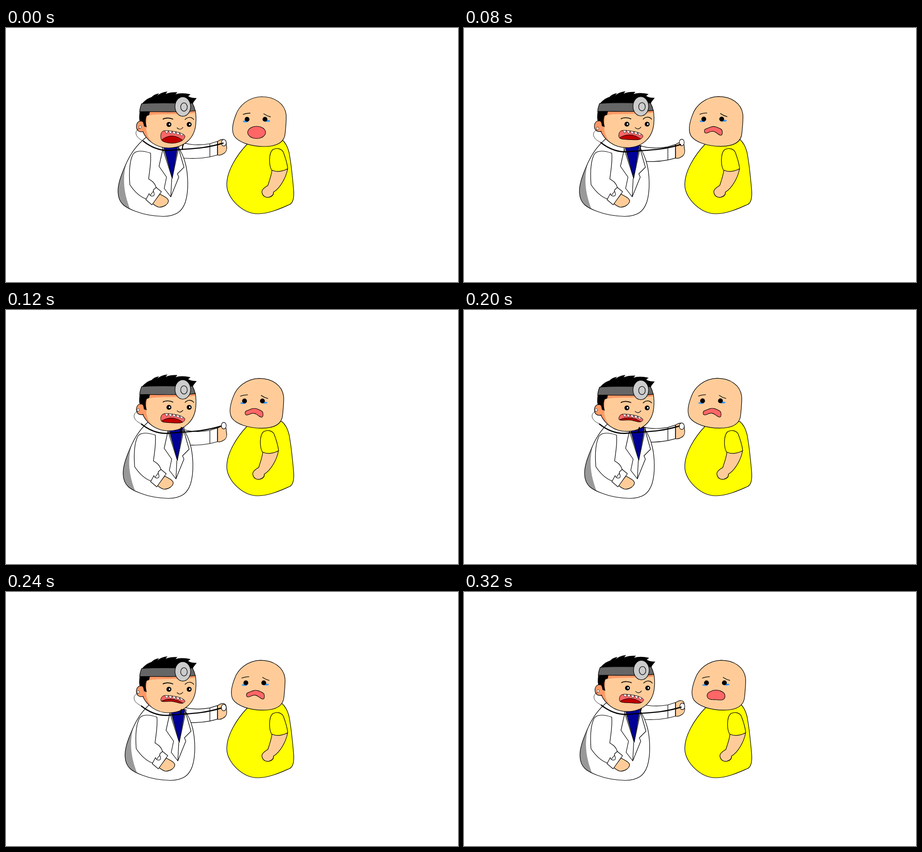
Write an HTML page with a canvas that moves like this. It is 960x540 px and loops after 0.36 s.

```html
<!DOCTYPE html>
<html lang="en">
<head>
<meta charset="utf-8">
<title>Check-up</title>
<style>
html, body { margin: 0; width: 100%; height: 100%; overflow: hidden; background: #fff; }
canvas { display: block; width: 960px; height: 540px; }
</style>
</head>
<body>
<canvas id="stage" width="960" height="540"></canvas>
<script>
const ctx = document.getElementById('stage').getContext('2d');
const STEP = 40, STEPS = 9;
const SKIN = '#ffcc99', SHADE = '#ff9966', PINK = '#ff6666', YELLOW = '#ffff00';

const mix = (a, b, u) => a + (b - a) * u;

// Straight moves between [step, value] key points
function move(step, ...keys) {
  const i = keys.findIndex(key => key[0] >= step);
  if (i < 0) return keys[keys.length - 1][1];
  if (i === 0) return keys[0][1];
  const [a, from] = keys[i - 1], [b, to] = keys[i];
  return mix(from, to, (step - a) / (b - a));
}

function pose(step) {
  return {
    coatX: move(step, [0, 0], [5, 18.2], [8, 8.4]),
    sleeveX: move(step, [0, 0], [5, 17], [8, 6.7]),
    reachY: move(step, [0, 0], [3, 10], [8, -6]),
    headX: move(step, [6, 0], [8, 1.2]),
    headY: move(step, [0, 0], [2, -0.6], [4, 4.4], [8, -0.9]),
    tubeX: move(step, [0, 0], [2, -1], [3, -4], [6, -4], [8, 0]),
    tubeY: move(step, [0, 0], [2, 3], [3, 2], [6, 2], [8, 0]),
    sickX: move(step, [1, 0], [4, -8.1], [8, 3]),
    sickY: -0.2 * Math.min(step, 4),
    armX: -6.5 * Math.max(0, 3 - Math.abs(step - 3)),
    open: move(step, [0, 1], [2, 0.5], [3, 0.5], [4, 0], [6, 0], [8, 0.4]),
    sag: move(step, [0, 0], [2, 1], [6, 1], [8, 0.35])
  };
}

// Smooth closed curve through points
function loopThrough(points) {
  const n = points.length, path = new Path2D();
  const at = i => points[(i + n) % n];
  path.moveTo(...points[0]);
  for (let i = 0; i < n; i++) {
    const [a, b, c, d] = [at(i - 1), at(i), at(i + 1), at(i + 2)];
    path.bezierCurveTo(b[0] + (c[0] - a[0]) / 6, b[1] + (c[1] - a[1]) / 6,
      c[0] - (d[0] - b[0]) / 6, c[1] - (d[1] - b[1]) / 6, c[0], c[1]);
  }
  path.closePath();
  return path;
}

function shape(d, fill, width = 1.2) {
  const path = typeof d === 'string' ? new Path2D(d) : d;
  if (fill) { ctx.fillStyle = fill; ctx.fill(path); }
  if (width) { ctx.lineWidth = width; ctx.stroke(path); }
}

function oval(x, y, rx, ry, fill, width = 0) {
  const path = new Path2D();
  path.ellipse(x, y, rx, ry, 0, 0, Math.PI * 2);
  shape(path, fill, width);
}

function at(x, y, draw) {
  ctx.save();
  ctx.translate(x, y);
  draw();
  ctx.restore();
}

function within(path, draw) {
  ctx.save();
  ctx.clip(path);
  draw();
  ctx.restore();
}

function reachingArm() {
  shape('M364 238 C382 250 412 250 433 246 L449 241 L449 270 L433 274 C412 278 394 278 364 276 Z', '#fff');
  shape('M433 246 V274');
  shape('M449.5 241 C454 238 458 236 462 237 C468 238 468 244 468 249 C470 257 468 264 462 267 C458 270 454 271 449.5 270 Z', SKIN);
}

function coat() {
  const body = new Path2D('M298 232 C276 250 264 268 254 291 C243 316 237 334 238 350 C239 374 254 382 276 390 C294 397 314 400 334 400.5 C362 400 374 390 381 370 C389 344 386 310 382 292 C378 274 372 262 364 250 Z');
  shape(body, '#fff', 0);
  within(body, () => shape('M256 286 C248 315 248 345 263 384 H225 V286 Z', '#999', 0));
  shape(body);
  shape('M331 252 L368 250 L353 320 Z', '#999', 0.9);
  shape('M335 252 L365 250 L353 320 Z', '#000099', 0.9);
  shape('M333 258 L325 294 L341 317 L336 341 L350 359 L352 320');
  shape('M366 254 L378 296 L364 310 L367 317 L350 359');
}

function restingArm() {
  shape('M327 353 C337 359 345 362 345 368 C344 375 335 381 325 381 C320 380 316 377 311 373 Z', SKIN);
  shape('M307 266 C292 261 277 259 270 268 C262 283 261 306 263 333 C272 347 286 361 300 364 L319 339 C316 329 310 325 303 321 C304 308 309 287 307 266 Z', '#fff');
  shape('M319 339 L330 348 L310 376 L297 365 L304 352 C305 357 309 358 313 357 C318 353 312 349 313 345 C314 342 317 341 319 339 Z', '#fff');
}

function eye(x, y) {
  oval(x, y, 5.2, 5.2, '#000');
  oval(x + 1.3, y - 0.2, 1.7, 1.9, '#fff');
}

function talkingMouth(open) {
  const left = [332, 231 + 9 * open], right = [373, 235 + 5 * open];
  const mouth = loopThrough([
    [329, 226], [335, 218.7], [352, 219.2], [370, 223], [380, 229.8],
    right, [353, 231 + 14 * open], left
  ]);
  const gum = x => 216 + 8 * ((x - 335) / 45) ** 2;
  shape(mouth, PINK, 0);
  within(mouth, () => {
    shape(`M${left[0] - 4} ${left[1]} Q352 219 ${right[0] + 4} ${right[1]} V250 H325 Z`, '#c00000', 1);
    for (let x = 337; x < 376; x += 8) {
      const tip = gum(x + 4) + 8;
      shape(`M${x} ${gum(x)} Q${x + 1} ${tip - 2} ${x + 4.5} ${tip} Q${x + 7} ${tip - 2} ${x + 8} ${gum(x + 8)} Z`, '#fff', 0.8);
    }
  });
  shape(mouth, null, 1);
}

function doctorHead(open) {
  const face = new Path2D('M288 176 L290 219 C298 238 318 255 345 255 C378 255 400 235 403 205 C404 195 404 186 402 175 Z');
  shape(face, SKIN, 0);
  within(face, () => {
    shape('M280 176 H300 L298 205 C296 225 304 240 322 256 H280 Z', SHADE, 0);
    shape('M300 187 C312 181 378 185 404 180 V174 H300 Z', SHADE, 0);
  });
  shape(face);
  shape('M293 197 C284 195 277 201 277 209 C277 217 282 223 292 220', SHADE);
  shape('M284 176 C283 186 282 196 285 199 C291 197 292 202 293 209 L299 211 C296 201 296 193 299 187 L304 185 L306 176 Z', '#000', 0);
  shape('M287 163 C294 155 299 150 309 147 C314 142 319 140 325 139 L321 144 C328 138 335 136 343 135 L339 140 C347 137 355 136 364 136.5 L360 141 C369 138 378 138 392 141 L387 145 C392 148 398 149 405 149 L398 158 L396 164 Z', '#000', 0);
  shape('M288 161 C310 158 370 160 396 160 C399 165 401 171 402 176 C370 180 315 177 284 178 C284 172 286 166 288 161 Z', '#666');
  oval(375.5, 167, 16.6, 20.6, '#ccc', 1.2);
  oval(378, 168, 7, 8.8, '#ccc', 1.2);
  shape('M333 194 C339 190 349 191 355 194', null, 1.7);
  shape('M380 195 C385 189 394 188 399 195', null, 1.4);
  eye(346, 205);
  eye(389, 205);
  shape('M363 212 Q370 219 376 211');
  talkingMouth(open);
}

function stethoscope() {
  shape('M285 213 C274 216 270 230 291 240', null, 0.8);
  oval(284.8, 210.5, 2.4, 3, '#fff', 0.7);
  shape('M377 247 Q374 252 375 259', null, 2.3);
  shape('M291 240 C306 252 327 262 350 260 C388 256 418 258 462 244.5', null, 2.4);
}

function patientBody() {
  shape('M513 246 C490 270 468 305 469 335 C470 362 502 395 535 395 C560 395 587 382 602 375.5 C610 372 612 362 611 346 C609 322 605 284 601 264 C598 252 593 243 586 237 Z', YELLOW);
}

function patientArm() {
  shape('M565 302 C563 316 558 329 556 335 C547 340 542 346 544 351 C546 358 552 361 558 360 C565 358 569 354 568 349 C583 340 595 317 598 300 Z', SKIN);
  shape('M566 259 C574 254 585 256 589 264 C594 277 597 287 598.5 299 C588 305 575 307 564 302 C558 291 558 267 566 259 Z', YELLOW);
}

// An oval that thins and bends into a crooked frown
function groaningMouth(sag) {
  const points = [];
  for (let i = 0; i < 24; i++) {
    const a = i * Math.PI / 12, u = Math.cos(a), s = Math.sin(a);
    const thick = mix(13, 5.2 + 5 * u * u + 2 * u, sag);
    const bulge = Math.sign(s) * Math.abs(s) ** mix(1, 0.75, sag);
    const bend = -4 - 3 * Math.cos(Math.PI * u) + 1.5 * u;
    points.push([532.3 + 19 * u, 222 + thick * bulge + sag * bend]);
  }
  shape(loopThrough(points), PINK, 1.1);
}

function patientHead(sag) {
  shape('M543 146 C515 147 495 165 488 185 C481 203 479 220 485 230 C494 243 520 252 548 252 C579 252 592 241 593 223 C594 211 596 195 595 184 C592 161 571 146 543 146 Z', SKIN);
  shape('M503 184 Q510 181 519 181', null, 1.3);
  shape('M547 182 Q554 187 562 189', null, 1.3);
  oval(509, 198.5, 6, 2, '#3399ff');
  oval(555, 197.5, 6, 2, '#3399ff');
  oval(512, 194, 5.1, 5.1, '#000');
  oval(550, 194, 5.1, 5.1, '#000');
  groaningMouth(sag);
}

function draw(step) {
  const p = pose(step);
  ctx.fillStyle = '#fff';
  ctx.fillRect(0, 0, 960, 540);
  patientBody();
  at(p.armX, 0, patientArm);
  at(p.sickX, p.sickY, () => patientHead(p.sag));
  at(0, p.reachY, reachingArm);
  at(p.coatX, 0, coat);
  at(p.sleeveX, 0, restingArm);
  at(p.headX, p.headY, () => {
    doctorHead(p.open);
    oval(462.5, 244, 5.2, 7, '#fff', 1.1);
  });
  at(p.tubeX, p.tubeY, stethoscope);
}

ctx.lineJoin = 'round';
const start = performance.now();
function tick() {
  const t = performance.now() - start;
  draw(Math.floor(t / STEP) % STEPS);
  requestAnimationFrame(tick);
}
tick();
</script>
</body>
</html>
```
